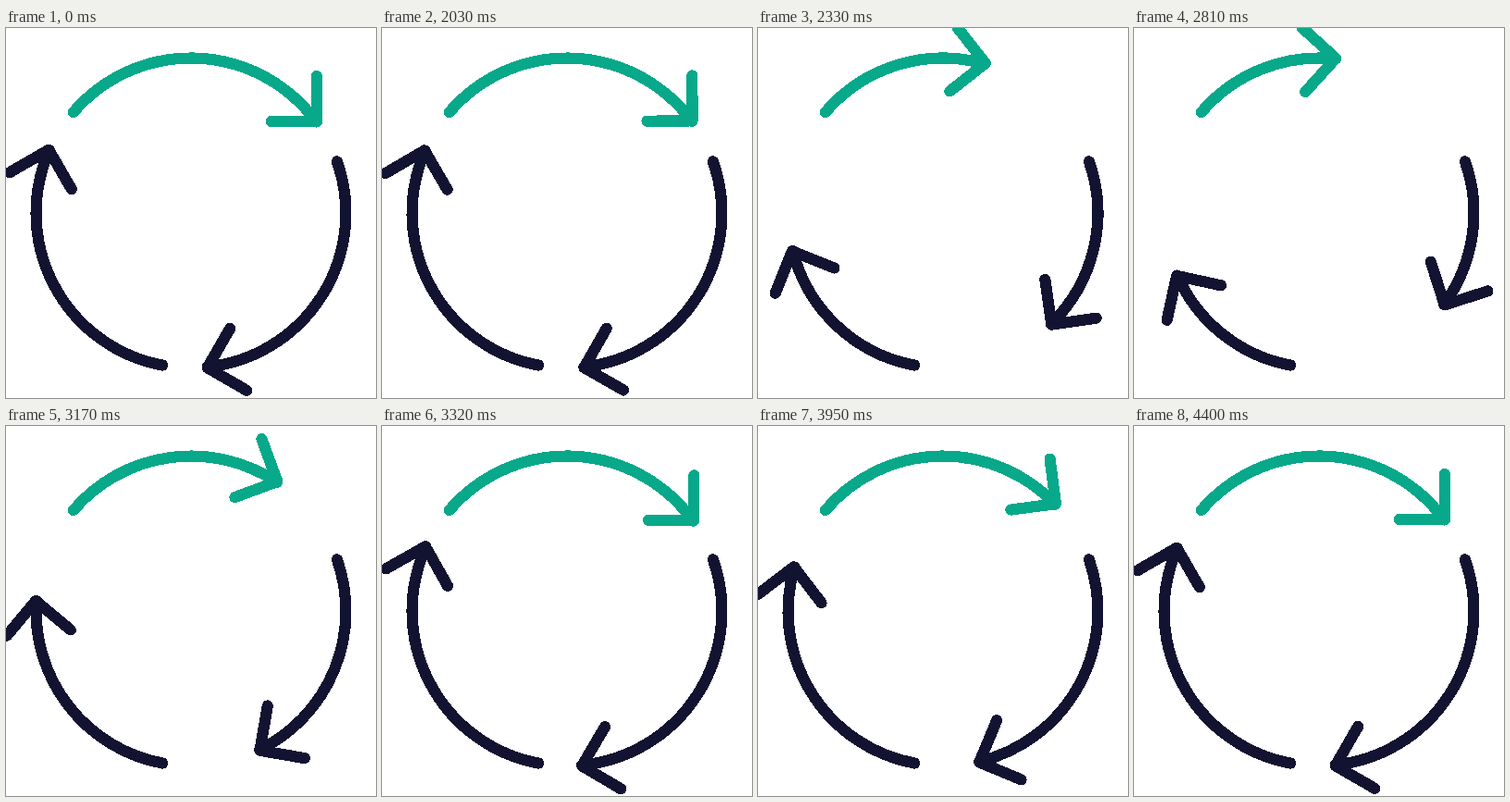
Write an HTML page that moves like this. It is 400 px wide and 400 px high and loops after 4.43 s.

```html
<!DOCTYPE html>
<html lang="en">
<head>
<meta charset="utf-8">
<title>Cycle arrows</title>
<style>
  html, body { margin: 0; width: 100%; height: 100%; overflow: hidden; background: #fff; }
  svg { display: block; width: 100vw; height: 100vh; shape-rendering: crispEdges; }
  path { fill: none; stroke: #121331; stroke-width: 12.16; stroke-linecap: round; stroke-linejoin: round; }
  .lead { stroke: #08a88a; }
</style>
</head>
<body>
<svg viewBox="0 0 400 400">
  <g transform="translate(200 200)">
    <g><path class="lead shaft"/><path class="lead head"/></g>
    <g transform="rotate(120)"><path class="shaft"/><path class="head"/></g>
    <g transform="rotate(240)"><path class="shaft"/><path class="head"/></g>
  </g>
</svg>
<script>
const LOOP = 4430, HOLD = 2030, STEP = 30;
const R = 167.44, TIP = 168.2, ARM = 49;
const TAIL = -139.4, REST = -36.05;
const shafts = document.querySelectorAll('.shaft');
const heads = document.querySelectorAll('.head');

const smooth = u => u * u * (3 - 2 * u);

// Quick start, long settle: cubic bezier (0.2, 0, 0, 1)
function settle(u) {
  let lo = 0, hi = 1;
  for (let i = 0; i < 24; i++) {
    const s = (lo + hi) / 2;
    if (0.6 * s * (1 - s) ** 2 + s ** 3 < u) lo = s; else hi = s;
  }
  return smooth(lo);
}

// [start ms, end ms, from angle, to angle, easing]
const moves = [
  [2011, 2816, REST, -83.8, settle],
  [2893, 3460, -83.8, -26.8, smooth],
  [3460, 4085, -26.8, -45.8, smooth],
  [4085, 4400, -45.8, REST, smooth]
];

function angleAt(t) {
  let angle = REST;
  if (t < HOLD) return angle;
  for (const [start, end, from, to, ease] of moves) {
    if (t < start) break;
    angle = from + (to - from) * ease(Math.min(1, (t - start) / (end - start)));
  }
  return angle;
}

function polar(r, deg) {
  const a = deg * Math.PI / 180;
  return (r * Math.cos(a)).toFixed(2) + ' ' + (r * Math.sin(a)).toFixed(2);
}

function draw(t) {
  const a = angleAt(t);
  const arc = `M${polar(R, TAIL)}A${R} ${R} 0 0 1 ${polar(R, a)}`;
  const turn = a - REST;
  const head = `M${polar(TIP, a)}l${polar(ARM, turn - 90)}M${polar(TIP, a)}l${polar(ARM, turn + 180)}`;
  shafts.forEach(p => p.setAttribute('d', arc));
  heads.forEach(p => p.setAttribute('d', head));
}

const origin = performance.now();
function tick() {
  const t = (performance.now() - origin) % LOOP;
  draw(t < HOLD ? 0 : HOLD + Math.floor((t - HOLD) / STEP) * STEP);
  requestAnimationFrame(tick);
}
tick();
</script>
</body>
</html>
```
